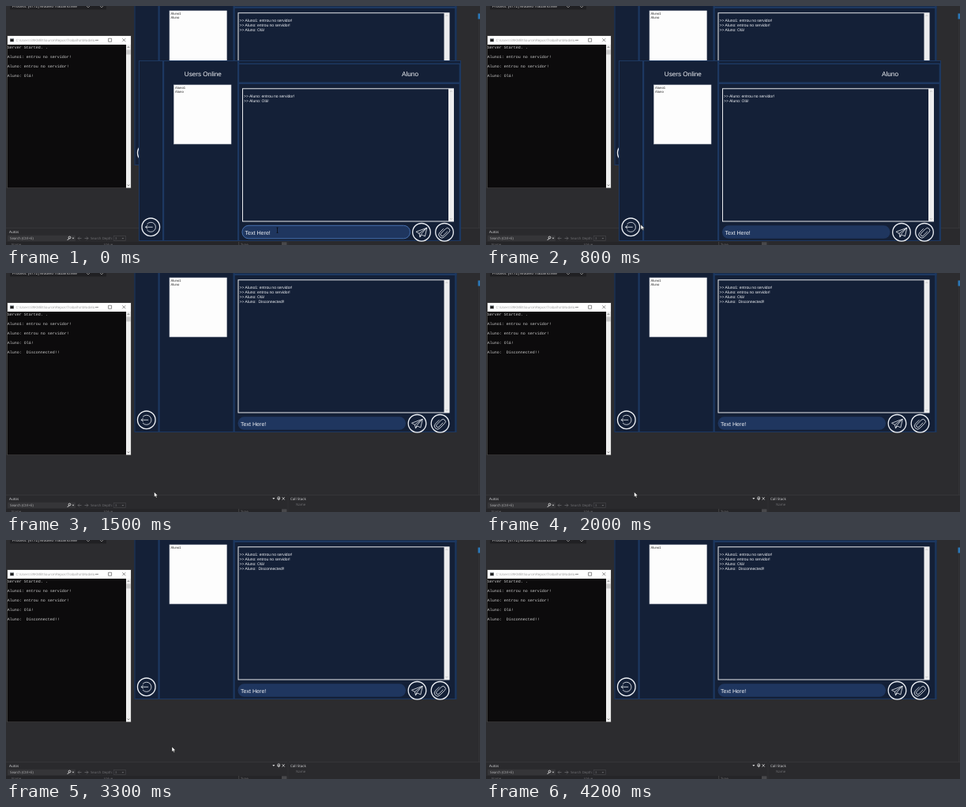
An HTML page for the animation above (4.5 s loop, 600 by 303 pixels).

```html
<!DOCTYPE html>
<html lang="pt">
<head>
<meta charset="utf-8">
<title>Chat desktop</title>
<style>
html, body { margin: 0; width: 100%; height: 100%; overflow: hidden; background: #2c2c2f; }
svg { display: block; width: 100vw; height: 100vh; }
text { white-space: pre; text-rendering: geometricPrecision; }
.ui { font-family: "Liberation Sans", Arial, sans-serif; fill: #f2f4f8; }
.mono { font-family: "Liberation Mono", monospace; fill: #cfcfcf; }
.ide { font-family: "Open Sans", "Noto Sans", sans-serif; }
.icon { fill: none; stroke: #eef1f6; stroke-width: .8; stroke-linejoin: round; stroke-linecap: round; }
</style>
</head>
<body>
<svg id="stage" viewBox="0 0 600 303" xmlns="http://www.w3.org/2000/svg"></svg>
<script>
const LOOP = 4500, STEP = 100, CLOSE_AT = 1500, LIST_AT = 2400;
const USERS = ["Aluno1", "Aluno"];
const joined = name => `${name}: entrou no servidor!`;
const HELLO = `${USERS[1]}: Olá!`, LEFT = `${USERS[1]}:  Disconnected!!`;

const rect = (x, y, w, h, fill, extra = "") =>
  `<rect x="${x}" y="${y}" width="${w}" height="${h}" fill="${fill}" ${extra}/>`;
const text = (x, y, size, str, cls = "ui", extra = "") =>
  `<text x="${x}" y="${y}" font-size="${size}" class="${cls}" ${extra}>${str.replace(/>/g, "&gt;")}</text>`;
const path = (d, extra = "") => `<path d="${d}" ${extra}/>`;
const group = (id, body) => `<g id="${id}">${body}</g>`;

function roundButton(x, y, icon, id = "") {
  return `<g transform="translate(${x} ${y})" class="icon">
    <circle r="11.3" stroke-width="1.3"/><g id="${id}">${icon}</g></g>`;
}

const backIcon = path("M-4.4 -4.2A6.1 6.1 0 1 1 -4.4 4.2M2 0H-6.6M-4.3 -2.1L-6.6 0L-4.3 2.1");
const planeIcon = path("M6.5 -5.5L-7 -.5L-3 1.6L-2 6L.4 3.3L4 5ZM-3 1.6L6.5 -5.5L-.6 2.6L-2 6");
const clipIcon = `<g transform="rotate(45)">${path(
  "M2 -3V4A2 2 0 0 1 -2 4V-4.3A3 3 0 0 1 4 -4.3V4.5A4 4 0 0 1 -4 4.5V-2")}</g>`;

// dy places the right pane and frame, listDy the user list and back button
function chatWindow(id, dx, dy, listDy, lines) {
  const x = n => n + dx, y = n => n + dy, ly = n => n + listDy, line = "#1d3861";
  return group(id,
    rect(x(168), y(69), 408, 229, "#142037") +
    rect(x(168.5), y(69.5), 407, 228, "none", `stroke="${line}"`) +
    rect(x(198), y(70), 2.2, 227, line) +
    rect(x(293), y(70), 2.2, 227, line) +
    rect(x(294), y(72.5), 282, 1.5, line) +
    rect(x(294), y(96.5), 282, 2.5, line) +
    rect(x(573.7), y(74), 1.6, 223, line) +
    text(x(249.3), y(88.6), 8.15, "Users Online", "ui", 'text-anchor="middle"') +
    text(x(511.5), y(88.6), 8.3, USERS[1], "ui", 'text-anchor="middle"') +
    rect(x(212.5), ly(100), 72.5, 75, "#fdfdfd", 'stroke="#bfc4cc" stroke-width=".6"') +
    USERS.map((name, i) =>
      text(x(214), ly(104.6 + i * 5), 4.2, name, "ui", `id="${id}User${i}" style="fill:#222"`)).join("") +
    rect(x(299.5), y(104.8), 267, 168.2, "none", 'stroke="#e9ebee"') +
    rect(x(560), y(105), 6.6, 168, "#ededee") +
    path(`M${x(562)} ${y(109)}l1.4 -1.5l1.4 1.5M${x(562)} ${y(269)}l1.4 1.5l1.4 -1.5`,
      'fill="none" stroke="#aaa" stroke-width=".6"') +
    lines.map((str, i) =>
      text(x(301), y(116.2 + i * 6), 5, ">> " + str, "ui", `id="${id}Line${i}"`)).join("") +
    rect(x(299), y(278.3), 212.5, 16.5, "#1f365f", `rx="8" id="${id}Field"`) +
    text(x(302.5), y(289.5), 7.1, "Text Here!") +
    roundButton(x(183.3), ly(280.3), backIcon, id + "Back") +
    roundButton(x(526), y(286.8), planeIcon) +
    roundButton(x(555), y(286.8), clipIcon));
}

function consoleWindow() {
  const lines = ["Server Started. .", joined(USERS[0]), joined(USERS[1]), HELLO, LEFT];
  return rect(1.5, 37.5, 157, 193.5, "#555") +
    rect(2, 38, 156, 11, "#fff") +
    rect(5, 41, 5, 4.5, "#8d949b") + rect(5.5, 42, 4, 3, "#222") +
    text(12.5, 45, 4.4, "C:\\Users\\39KMB\\Source\\Repos\\Trabalho\\Modelo...", "ide", 'fill="#999"') +
    path("M113 43.3h4M129.6 41.2h4v4h-4ZM147.3 41.2l4 4m0 -4l-4 4", 'fill="none" stroke="#444" stroke-width=".6"') +
    rect(2, 49, 150, 181.5, "#0c0b0c") +
    rect(152, 49, 6, 181.5, "#efefef") +
    rect(152.3, 55.5, 5.4, 6, "#c9c9c9") +
    path("M153.7 53l1.3 -1.4l1.3 1.4M153.7 226.5l1.3 1.4l1.3 -1.4", 'fill="none" stroke="#555" stroke-width=".7"') +
    lines.map((str, i) => text(1.7, 54.2 + i * 12.05, 5, str, "mono", `id="log${i}"`)).join("");
}

function desktop() {
  const dim = 'fill="#707074"', pale = 'fill="#d6d6d8"';
  return rect(0, 0, 600, 303, "#2c2c2f") +
    rect(5, 0, 122, 4.5, "#202023") +
    text(8, 1.5, 4.8, "Process: [4172] Modelo Trabalho.exe", "ide", pale) +
    path("M102 0l2 2l2 -2M119 0l2 2l2 -2", 'fill="none" stroke="#aaa" stroke-width=".7"') +
    rect(597.5, 9.5, 2.5, 7, "#2b78b8") +
    rect(598.5, 17, .7, 264, "#39393d") +
    rect(0, 281, 356, 22, "#2a2a2d") +
    rect(358, 281, 242, 22, "#2a2a2d") +
    rect(0, 281, 356, .6, "#3c3c40") + rect(358, 281, 242, .6, "#3c3c40") +
    text(4, 287.6, 4.6, "Autos", "ide", pale) +
    path("M337.3 285l1.5 2l1.5 -2Z", 'fill="#ddd"') +
    path("M344 284h2.4v2.5h-2.4ZM343.4 286.5h3.6M345.2 286.5v2M349.7 284.2l3 3.4m0 -3.4l-3 3.4",
      'fill="none" stroke="#ddd" stroke-width=".75"') +
    text(360, 287.6, 4.5, "Call Stack", "ide", pale) +
    rect(2, 290.8, 86, 7.4, "#353538") +
    text(5, 296.2, 4.4, "Search (Ctrl+E)", "ide", 'fill="#b8b8ba"') +
    path("M80 294.5l-2.2 2.3", 'stroke="#eee" stroke-width="1"') +
    '<circle cx="80.5" cy="293.5" r="1.4" fill="none" stroke="#eee" stroke-width=".8"/>' +
    path("M83.7 293.8h2.6l-1.3 1.6Z", 'fill="#ccc"') +
    path("M95.5 294.5h-4.5m2 -2l-2 2l2 2M99.5 294.5h4.5m-2 -2l2 2l-2 2", 'fill="none" stroke="#66666a" stroke-width=".8"') +
    text(107, 296.2, 4.3, "Search Depth:", "ide", dim) +
    rect(136.5, 291.3, 15, 6.4, "none", 'stroke="#47474a" stroke-width=".6"') +
    text(138, 296.2, 4.3, "3", "ide", dim) +
    path("M146.7 294h2.4l-1.2 1.4Z", 'fill="#707074"') +
    rect(0, 299, 356, 4, "#252528") +
    text(7, 304, 4.4, "Name", "ide", dim) +
    text(124, 304, 4.4, "Value", "ide", dim) +
    text(297, 304, 4.4, "Type", "ide", dim) +
    rect(294.5, 299, .6, 4, "#555") +
    rect(349, 299.3, 6.5, 3.7, "#48484b") +
    text(367, 295.4, 4.4, "Name", "ide", dim);
}

const cursors = group("pointer",
    path("M0 0V6.6L1.5 5.2L2.6 7.6L3.7 7.1L2.7 4.8H4.7Z", 'fill="#fff" stroke="#111" stroke-width=".5"')) +
  group("beam", path("M-1 0H1M0 0V6.4M-1 6.4H1", 'fill="none" stroke="#080c14" stroke-width=".8"'));

document.getElementById("stage").innerHTML = desktop() + consoleWindow() +
  chatWindow("back", -5.5, -96, -94, [joined(USERS[0]), joined(USERS[1]), HELLO, LEFT]) +
  chatWindow("front", 0, 0, 0, [joined(USERS[1]), HELLO]) + cursors;

const $ = id => document.getElementById(id);
const show = (id, on) => $(id).setAttribute("display", on ? "inline" : "none");

// time, x, y of the mouse
const track = [
  [0, 343.5, 281], [600, 225, 282], [800, 196, 277], [1000, 187.5, 277.5],
  [2400, 187.5, 277.5], [2600, 190, 278], [2800, 190, 278], [3300, 210, 262],
  [3500, 246, 208], [3700, 290, 134], [3900, 296, 60], [4100, 298, 2], [4200, 299, -12], [LOOP, 299, -12]
];

function mouseAt(t) {
  const i = track.findIndex(key => key[0] > t);
  const [t0, x0, y0] = track[i - 1], [t1, x1, y1] = track[i];
  const k = (t - t0) / (t1 - t0);
  return [x0 + (x1 - x0) * k, y0 + (y1 - y0) * k];
}

function render(time) {
  const t = Math.floor(time % LOOP / STEP) * STEP;
  const [x, y] = mouseAt(t);
  const open = t < CLOSE_AT, overField = open && x > 299;
  show("front", open);
  show("log4", !open);
  show("backLine3", !open);
  show("backUser1", t < LIST_AT);
  show("pointer", !overField);
  show("beam", overField);
  for (const id of ["pointer", "beam"]) $(id).setAttribute("transform", `translate(${x} ${y})`);
  $("frontField").setAttribute("stroke", overField ? "#456fae" : "none");
  $("frontBack").setAttribute("opacity", open && x < 194 ? .65 : 1);
}

const start = performance.now();
function tick() {
  render(performance.now() - start);
  requestAnimationFrame(tick);
}
tick();
</script>
</body>
</html>
```
